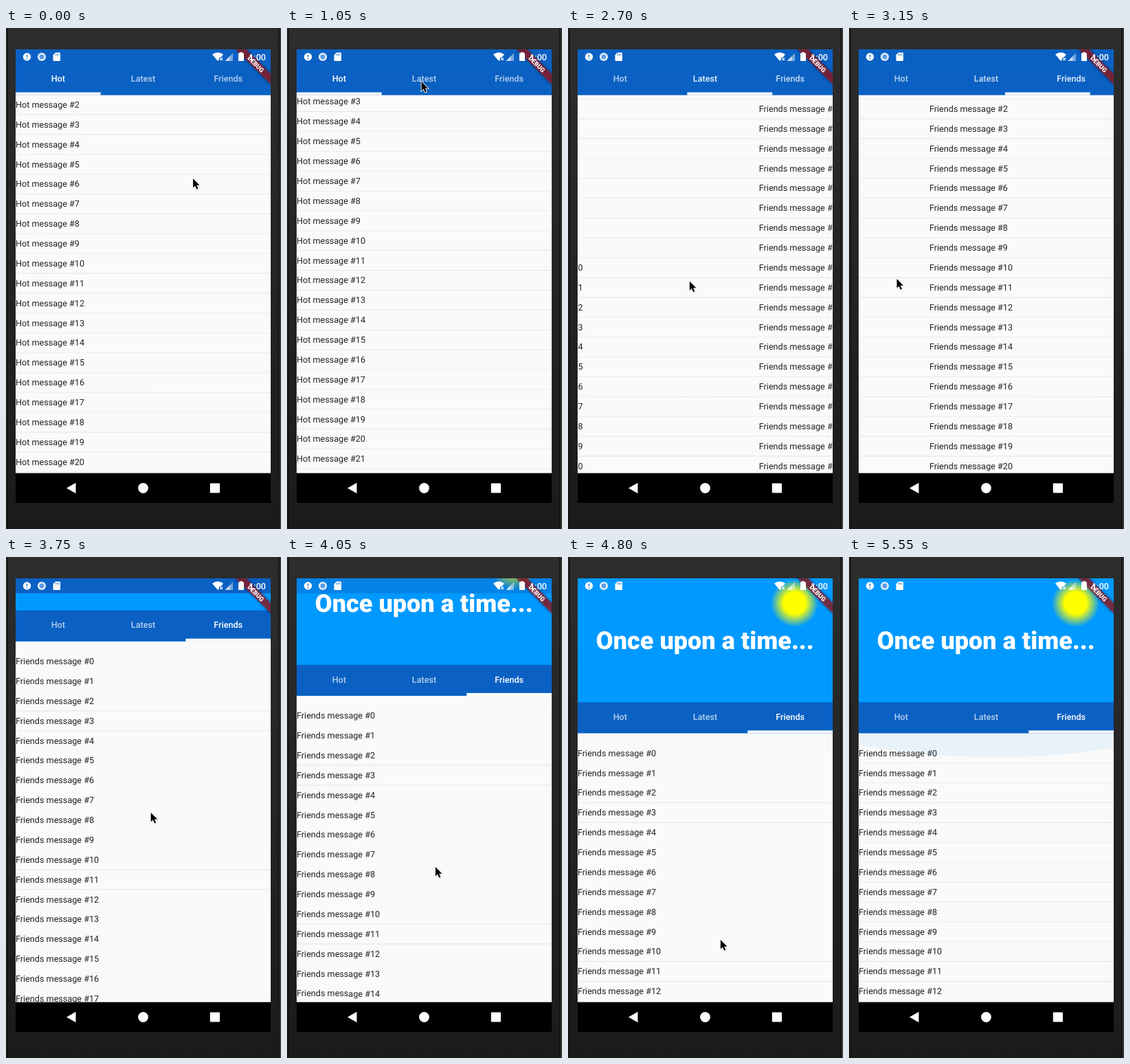
Write an HTML page that moves like this. It is 400 px wide and 729 px high and loops after 6.55 s.

```html
<!DOCTYPE html>
<html lang="en">
<head>
<meta charset="utf-8">
<title>Tabs under a collapsing header</title>
<style>
  html, body { margin: 0; width: 100%; height: 100%; overflow: hidden; background: #1c1c1c; }
  svg { display: block; width: 400px; height: 729px; font-family: Roboto, sans-serif; text-rendering: geometricPrecision; }
  .row { font-size: 12.63px; fill: #222; }
  .rule { fill: #ebebeb; }
  .strong { fill: #e3e3e3; }
  .tab { font-size: 12.63px; font-weight: 500; fill: #fff; text-anchor: middle; }
  .title { font-size: 36.08px; font-weight: 900; fill: #fff; text-anchor: middle; }
  .debug { font-size: 9.2px; font-weight: 900; fill: #fff; text-anchor: middle; }
</style>
</head>
<body>
<svg viewBox="0 0 400 729">
  <defs>
    <linearGradient id="shell" x2="0" y2="1">
      <stop stop-color="#2d2d2d"/><stop offset=".5" stop-color="#242424"/><stop offset="1" stop-color="#1b1b1b"/>
    </linearGradient>
    <radialGradient id="sun" gradientUnits="userSpaceOnUse" cx="329.5" cy="67.1" r="36.1">
      <stop offset=".44" stop-color="#ff0"/><stop offset=".96" stop-color="#09f"/>
    </radialGradient>
    <clipPath id="screen"><rect x="14" y="31" width="371" height="617"/></clipPath>
    <filter id="soft" x="-20%" y="-80%" width="140%" height="260%"><feGaussianBlur stdDeviation="2"/></filter>
  </defs>

  <rect width="400" height="729" fill="url(#shell)"/>
  <path d="M2 0V729M397 0V729" stroke="#111" stroke-width="1.5"/>
  <path d="M399 0V729" stroke="#383838" stroke-width="2"/>

  <g clip-path="url(#screen)">
    <rect x="14" y="31" width="371" height="617" fill="#fafafa"/>
    <g id="pages"></g>
    <path id="glow" fill="#2196f3"/>

    <g id="header">
      <rect x="14" y="31" width="371" height="181" fill="url(#sun)"/>
      <text class="title" x="199.2" y="134">Once upon a time...</text>
    </g>
    <rect id="tint" x="14" y="31" width="371" height="21.7" fill="#0a61c3"/>
    <g id="bar">
      <rect x="14" y="211.4" width="371" height="45.1" fill="#0a61c3"/>
      <rect id="indicator" y="252.4" width="123.7" height="4.1" fill="#fff"/>
    </g>

    <g transform="translate(385 31) rotate(45)">
      <rect x="-36.1" y="25.2" width="72.2" height="10.9" opacity=".5" filter="url(#soft)"/>
      <rect x="-36.1" y="25.2" width="72.2" height="10.9" fill="#a51a24" opacity=".68"/>
      <text class="debug" y="33.9">DEBUG</text>
    </g>

    <g fill="#fff">
      <circle cx="30.5" cy="42" r="5.7"/>
      <path d="M30.5 38.8V42.6M30.5 44V45.4" stroke="#0a61c3" stroke-width="1.3"/>
      <circle cx="52" cy="42" r="6.1" fill="#e3edf9"/>
      <circle cx="52" cy="42" r="3.4" fill="#5b9fe8"/>
      <path d="M72 35.8H78Q79 35.8 79 36.8V47Q79 48 78 48H69.5Q68.5 48 68.5 47V39.3Z"/>
      <path d="M72.5 37.7V40M74.6 37.7V40M76.7 37.7V40" stroke="#0a61c3" stroke-width=".9"/>
      <path d="M300 38.6Q308 32.6 316 38.6L312.6 42.7H310V45.9L308 48Z"/>
      <path d="M311.3 43.5L315 47.2M315 43.5L311.3 47.2" stroke="#fff" stroke-width="1.1"/>
      <path d="M318.5 48L330 36.5V48Z" opacity=".45"/>
      <path d="M318.5 48L325.5 41V48Z" opacity=".55"/>
      <path d="M340 36.4V35.2H344V36.4H346V48H338V36.4Z"/>
      <text x="378" y="46.8" font-size="12.63" font-weight="500" text-anchor="end">1:00</text>
    </g>
  </g>

  <rect x="14" y="647.7" width="371" height="43.3"/>
  <g fill="#fff">
    <path d="M88 669.5L101.5 661.7V677.3Z"/>
    <circle cx="199.5" cy="669.5" r="7.4"/>
    <rect x="296.8" y="662.4" width="14.2" height="14.2" rx="1"/>
  </g>

  <g id="cursor">
    <g transform="scale(.9)">
      <path d="M1 2V17.5L4.7 14L7.3 20L10 18.8L7.5 13H13Z" opacity=".22" filter="url(#soft)"/>
      <path d="M.6 1.2V16L4 12.8L6.5 18.5L8.9 17.5L6.5 11.9H11.2Z" stroke="#fff" stroke-width="2" paint-order="stroke"/>
    </g>
  </g>
</svg>

<script>
const LOOP = 6550, TICK = 150;
const LEFT = 14, WIDTH = 371, ROW = 28.88, PAD = 14.4;
const BAR_BOTTOM = 256.5, COLLAPSE = 158.8, INNER = 66.7;
const PULL_FROM = 279;
const TABS = ["Hot", "Latest", "Friends"];

const $ = id => document.getElementById(id);
const clamp = (v, lo, hi) => Math.min(hi, Math.max(lo, v));
const ramp = (t, from, to) => clamp((t - from) / (to - from), 0, 1);
const glide = (t, from, to) => 1 - (1 - ramp(t, from, to)) ** 1.6;
const move = (node, x, y, extra = "") => node.setAttribute("transform", `translate(${x} ${y}) ${extra}`);

function add(parent, tag, attrs, text = "") {
  const node = document.createElementNS("http://www.w3.org/2000/svg", tag);
  for (const name in attrs) node.setAttribute(name, attrs[name]);
  node.textContent = text;
  return parent.appendChild(node);
}

// Each gesture takes the pointer from wherever it rests to (x, y).
const gestures = [
  { from: 0, to: 300, x: 271.5, y: 207 },
  { from: 450, to: 1050, x: 195, y: 77 },
  { from: 1500, to: 2250, x: 312, y: 372 },
  { from: 2400, to: 3150, x: 69, y: 364 },
  { from: 3150, to: 3450, x: 203, y: 263 },
  { from: 3450, to: 4350, x: 218, y: 489 },
  { from: 4500, to: 5400, x: 228, y: 690, ease: ramp }
];

function pointer(t) {
  let x = 271.5, y = 218;
  for (const g of gestures) {
    const k = (g.ease || glide)(t, g.from, g.to);
    x += (g.x - x) * k;
    y += (g.y - y) * k;
  }
  return { x, y };
}

const faintRules = [];
const pages = TABS.map(name => {
  const page = add($("pages"), "g", {});
  for (let i = 0; i < 26; i++) {
    add(page, "text", { class: "row", x: 0, y: i * ROW + 18.75 }, `${name} message #${i}`);
    const strong = i % 8 === 2 || i % 8 === 3;
    const rule = add(page, "rect", {
      class: strong ? "rule strong" : "rule", x: 0, y: (i + 1) * ROW - .5, width: WIDTH, height: 1
    });
    if (!strong) faintRules.push(rule);
  }
  return page;
});
const labels = TABS.map((name, i) =>
  add($("bar"), "text", { class: "tab", x: LEFT + WIDTH * (i + .5) / 3, y: 237 }, name));

function render(t) {
  const { x, y } = pointer(t);
  const page = glide(t, 1350, 1800) + ramp(t, 2400, 3438);
  const hotScroll = 72.7 + 33.3 * glide(t, 0, 300);

  // The pull first uses up the list's own scroll, then opens the header.
  const pull = t > 3450 ? Math.max(0, y - PULL_FROM) : 0;
  const inner = Math.max(0, INNER - pull);
  const hidden = COLLAPSE - clamp(pull - INNER, 0, COLLAPSE);
  const listTop = BAR_BOTTOM - hidden + PAD;

  // A hair of rotation keeps baselines at fractional pixels.
  pages.forEach((node, i) =>
    move(node, LEFT + (i - page) * WIDTH, listTop - (i ? inner : hotScroll), "rotate(.005)"));
  labels.forEach((node, i) =>
    node.setAttribute("fill-opacity", .7 + .3 * clamp(1 - Math.abs(i - page), 0, 1)));
  $("indicator").setAttribute("x", LEFT + page * WIDTH / 3);
  move($("header"), 0, -hidden);
  move($("bar"), 0, -hidden);
  $("tint").setAttribute("opacity", clamp(hidden / COLLAPSE * 1.2, 0, 1));

  const scrolling = t >= 3600 && t < 4950;
  faintRules.forEach(rule => rule.setAttribute("opacity", scrolling ? 0 : 1));

  const depth = 43 - 8.5 * ramp(t, 5250, 5550);
  const side = BAR_BOTTOM + depth / 2;
  $("glow").setAttribute("d",
    `M14 ${BAR_BOTTOM}V${side}Q208 ${BAR_BOTTOM + depth * 1.46} 385 ${side + 4}V${BAR_BOTTOM}Z`);
  $("glow").setAttribute("opacity", .08 * ramp(t, 4650, 5550));

  move($("cursor"), x, y);
  $("cursor").setAttribute("opacity", t < 5550 ? 1 : 0);
}

const start = performance.now();
function frame() {
  const t = (performance.now() - start) % LOOP;
  render(Math.floor(t / TICK) * TICK);
  requestAnimationFrame(frame);
}
frame();
</script>
</body>
</html>
```
